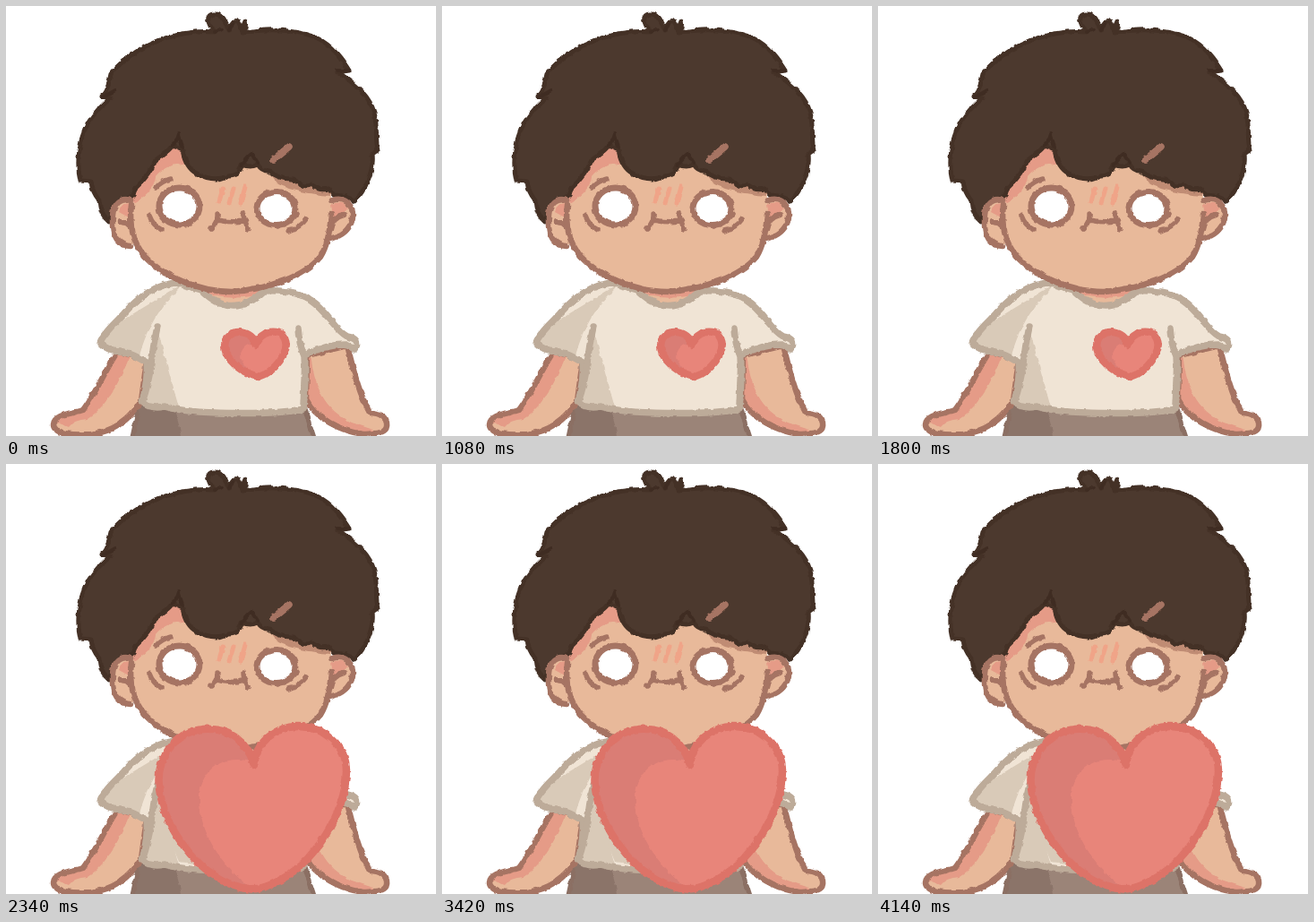
Write an HTML page that moves like this. It is 480x480 px and loops after 4320 ms.

```html
<!DOCTYPE html>
<html lang="en">
<head>
<meta charset="utf-8">
<title>Heart beat</title>
<style>
html, body { margin: 0; width: 100%; height: 100%; overflow: hidden; background: #fff; }
svg { display: block; width: 480px; height: 480px; }
path, ellipse { stroke-linecap: round; stroke-linejoin: round; }
.skin { fill: #e8b99a; }
.line { fill: none; stroke: #a67463; stroke-width: 6.5; }
.thin { fill: none; stroke: #a67463; stroke-width: 5.5; }
.pink { fill: #e59b87; }
.cloth { fill: #f0e4d5; }
.fold { fill: #d9cab8; }
.seam { fill: none; stroke: #bdab99; stroke-width: 7.5; }
.heart { fill: #e8857a; }
.dim { fill: #da7d75; }
.rim { fill: none; stroke: #dd7368; stroke-width: 8.5; }
.hair { fill: #4c392e; stroke: #443126; stroke-width: 5; }
.eye { fill: #fff; stroke: #a67463; stroke-width: 7; }
.blush { fill: none; stroke: #f0a488; stroke-width: 5; }
</style>
</head>
<body>
<svg viewBox="0 0 480 480">
  <defs>
    <filter id="rough" filterUnits="userSpaceOnUse" x="0" y="0" width="480" height="480" color-interpolation-filters="sRGB">
      <feTurbulence type="fractalNoise" baseFrequency="0.14" numOctaves="2" seed="7"/>
      <feDisplacementMap in="SourceGraphic" scale="4" xChannelSelector="R" yChannelSelector="G"/>
    </filter>
    <path id="leftArm" d="M125 385C114 400 103 428 86 451C73 455 54 456 53 467C53 479 77 479 95 478C122 475 140 459 151 441L157 396Z"/>
    <path id="rightArm" d="M336 390L381 379C387 402 393 431 406 454C417 454 426 459 425 469C424 478 411 477 399 478C374 475 345 460 335 439Z"/>
    <path id="face" d="M141 222C137 244 141 263 155 280C174 301 215 319 252 319C293 316 333 302 351 280C364 259 366 240 362 205V150H141Z"/>
    <path id="shirt" d="M190 309C165 311 146 327 131 344C119 357 108 366 105 376Q113 385 127 385Q143 389 157 398C159 417 154 432 152 443Q162 450 177 447C205 456 295 457 332 450L334 390Q355 378 379 378L389 383Q397 372 381 369C366 361 359 341 339 328Q322 316 288 318Q252 352 218 317Z"/>
    <path id="bigHeart" d="M277 336C269 309 249 294 220 296C188 299 167 329 171 361C176 405 212 456 256 471Q277 479 299 468C343 448 379 391 380 343C380 313 354 293 326 293C300 293 278 312 277 336Z"/>
    <path id="smallHeart" d="M279 378C275 362 253 360 246 371C239 386 254 407 282 414C299 409 318 386 311 371C305 359 284 362 279 378Z"/>
    <clipPath id="inArmL"><use href="#leftArm"/></clipPath>
    <clipPath id="inArmR"><use href="#rightArm"/></clipPath>
    <clipPath id="inFace"><use href="#face"/></clipPath>
    <clipPath id="inShirt"><use href="#shirt"/></clipPath>
    <clipPath id="inBig"><use href="#bigHeart"/></clipPath>
  </defs>

  <g filter="url(#rough)">
    <path fill="#9b8478" d="M150 438L139 490H346L334 438Z"/>
    <path fill="#8b7469" d="M150 438L139 490H197Q195 465 182 438Z"/>
    <path fill="none" stroke="#8b6f63" stroke-width="5" d="M147 453L140 486M334 452L345 486"/>

    <use href="#leftArm" class="skin"/>
    <path class="pink" clip-path="url(#inArmL)" d="M119 383L139 389C128 417 113 447 91 461Q75 462 70 470L50 462L84 448Z"/>
    <use href="#leftArm" class="line"/>
    <use href="#rightArm" class="skin"/>
    <path class="pink" clip-path="url(#inArmR)" d="M330 386H340C343 425 356 451 386 465L410 473V482H370L330 446Z"/>
    <use href="#rightArm" class="line"/>

    <path class="skin" d="M215 312H292Q274 338 250 336Q228 334 215 312Z"/>
    <path class="pink" d="M220 317H288L274 324Q251 328 230 323Z"/>
    <use href="#shirt" class="cloth"/>
    <g clip-path="url(#inShirt)" class="fold">
      <path d="M204 306C180 326 158 352 148 395H98V370Z"/>
      <path d="M169 358C176 389 185 420 195 455H148L160 390Z"/>
    </g>
    <use href="#shirt" class="seam"/>
    <path class="seam" d="M169 358Q164 379 162 399Q159 423 152 442M326 360Q327 376 333 391Q335 420 332 448"/>

    <use href="#face" class="skin"/>
    <g clip-path="url(#inFace)">
      <path class="pink" d="M139 222Q165 209 167 190Q177 177 199 176L190 135L139 198Z"/>
      <path fill="#c08c74" d="M294 186Q323 189 362 203V212Q326 209 304 199Z"/>
    </g>

    <path class="hair" d="M233 29C224 19 223 10 232 9C241 8 243 16 249 27C250 17 257 15 260 18L263 27L267 17Q269 22 264 30C293 24 323 27 343 34C362 41 374 57 383 72L370 74C388 85 406 101 411 119C415 134 412 147 415 161L409 165C411 184 401 206 389 218Q379 211 366 211L360 204Q349 207 341 199Q333 205 321 193Q304 194 294 184Q286 185 281 177Q272 181 262 177Q262 190 248 190Q232 197 213 187Q201 181 197 161L186 156Q179 164 167 172Q161 188 145 203Q142 215 133 215Q118 223 115 241Q105 233 104 217Q96 207 95 196L83 195C79 179 80 151 92 130Q101 115 117 103L107 101Q114 93 117 76C133 55 162 39 192 32Q214 27 233 29Z"/>
    <path fill="none" stroke="#3f2c22" stroke-width="4" d="M186 156Q191 151 193 143L197 158M263 177Q269 169 274 165L281 176M108 102L122 94M370 72L383 72M233 29L241 26M249 27L253 20"/>
    <path fill="none" stroke="#a67463" stroke-width="7.500" d="M298 172L316 157"/>

    <path class="skin" d="M143 219C126 211 118 224 119 239C118 258 126 267 139 268L145 262Z"/>
    <path class="pink" d="M140 220Q129 219 126 230L139 237Z"/>
    <path class="line" d="M139 217C126 213 118 224 119 239C118 258 126 267 139 268M128 241Q139 242 141 250"/>
    <path class="skin" d="M360 218C376 211 388 220 387 236C384 251 374 257 361 260L356 250Z"/>
    <path class="pink" d="M363 221Q379 216 382 227L365 236Z"/>
    <path class="line" d="M364 217C377 213 388 220 387 236C384 251 374 257 361 260M377 233Q364 236 362 249"/>
    <path class="line" d="M140 222C137 244 141 263 155 280C174 301 215 319 252 319C293 316 333 302 351 280Q361 264 363 232"/>

    <ellipse class="eye" cx="193.500" cy="223.500" rx="22.500" ry="20.500"/>
    <ellipse class="eye" cx="301.500" cy="226" rx="21.500" ry="18.500"/>
    <path class="thin" d="M160 234Q164 245 174 250M167 203Q174 195 184 193M335 238Q328 248 315 251M325 232L318 240"/>
    <path class="blush" d="M242 204L238 218M254 204L249 220M267 202L262 220"/>
  </g>

  <g id="rest" filter="url(#rough)">
    <path class="thin" d="M236 232Q237 240 229 249M236 239Q250 242 268 240M264 231Q267 240 270 249"/>
    <use href="#smallHeart" class="heart"/>
    <path class="dim" d="M280 378C270 374 259 384 263 395Q267 406 280 411C255 405 242 387 247 373C255 359 276 363 280 378Z"/>
    <use href="#smallHeart" class="rim"/>
  </g>

  <g id="beat" filter="url(#rough)" visibility="hidden">
    <path class="thin" d="M236 233Q236 242 229 248M235 241Q251 246 267 241M265 233Q265 243 270 249"/>
    <path class="fold" d="M174 385L218 447L193 444Q180 415 174 385Z"/>
    <use href="#bigHeart" class="heart"/>
    <path class="dim" clip-path="url(#inBig)" d="M277 333C246 323 218 338 216 370C214 405 235 443 271 472L238 480L160 390V280H277Z"/>
    <use href="#bigHeart" class="rim"/>
  </g>
</svg>
<script>
const STEP = 180;
const poses = ["rest", "beat"].map(id => document.getElementById(id));
const start = performance.now();
let shown = 0;

function draw(now) {
  const pose = Math.floor(Math.max(0, now - start) / STEP) % poses.length;
  if (pose !== shown) {
    poses.forEach((g, i) => g.setAttribute("visibility", i === pose ? "visible" : "hidden"));
    shown = pose;
  }
  requestAnimationFrame(draw);
}
requestAnimationFrame(draw);
</script>
</body>
</html>
```
